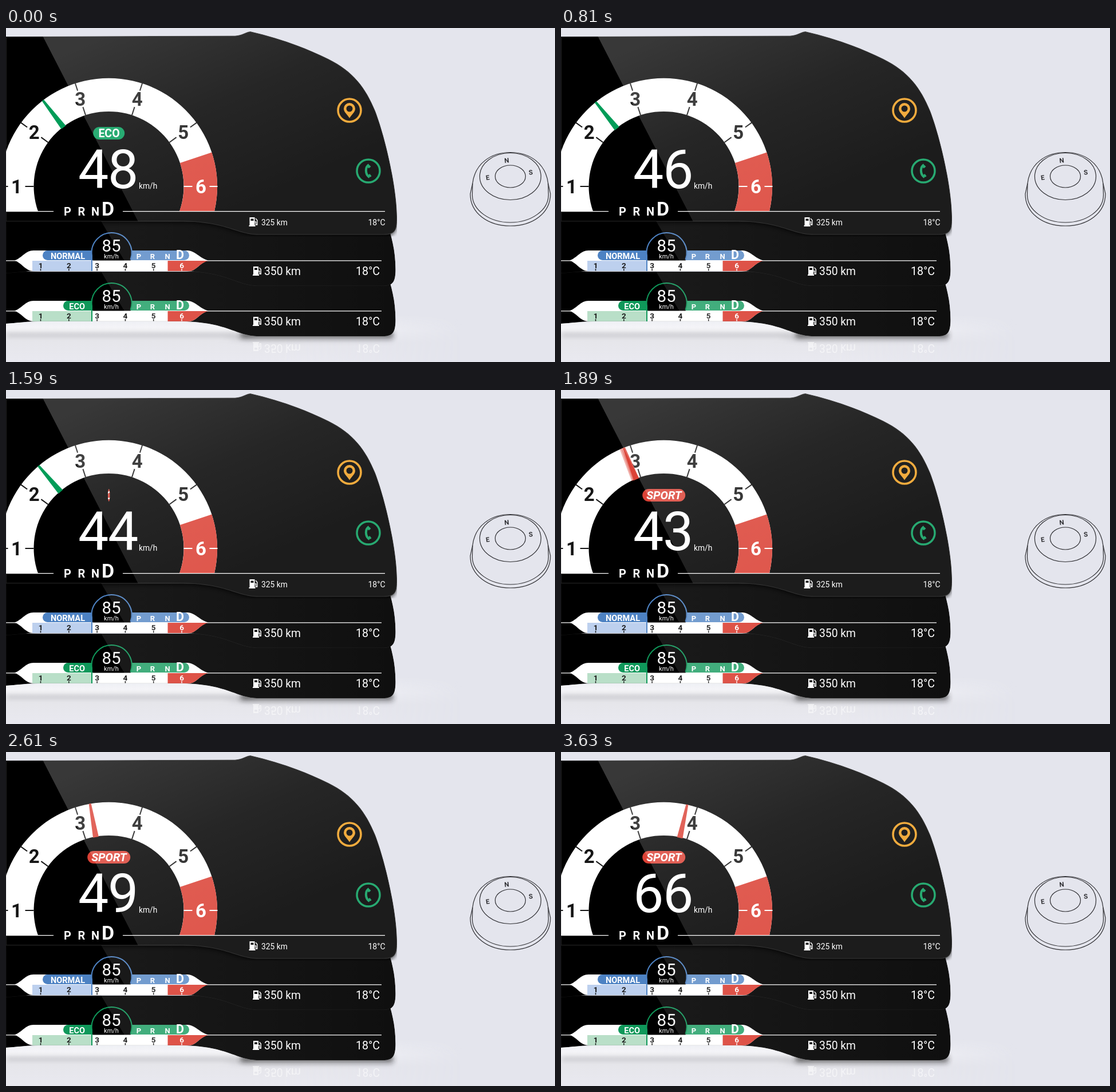
Recreate the animation shown at these times as an HTML page. Size 959 by 584 pixels, loop 3.66 s.

```html
<!DOCTYPE html>
<html lang="en">
<head>
<meta charset="utf-8">
<title>Instrument cluster</title>
<style>
  html, body { margin: 0; width: 100%; height: 100%; overflow: hidden; background: #e4e5ed; }
  svg { display: block; width: 959px; height: 584px; font-family: Roboto, Arial, sans-serif; }
  text { fill: #fff; }
  .b { font-weight: 700; }
  .m { text-anchor: middle; }
  .e { text-anchor: end; }
  .ink { fill: none; stroke: #303034; stroke-width: 1.2; }
  .knob text { fill: #303034; }
</style>
</head>
<body>
<svg viewBox="0 0 959 584">
  <defs>
    <linearGradient id="floor" x2="0" y2="1">
      <stop offset="0" stop-color="#fff" stop-opacity="0"/>
      <stop offset=".35" stop-color="#f6f6f9"/>
      <stop offset=".6" stop-color="#e6e6eb"/>
      <stop offset="1" stop-color="#e9e9f0"/>
    </linearGradient>
    <linearGradient id="side">
      <stop offset=".6" stop-color="#fff"/>
      <stop offset="1" stop-color="#fff" stop-opacity="0"/>
    </linearGradient>
    <mask id="fadeRight"><rect y="490" width="800" height="94" fill="url(#side)"/></mask>
    <linearGradient id="glare" gradientUnits="userSpaceOnUse" x1="180" y1="10" x2="330" y2="350">
      <stop offset="0" stop-color="#fff" stop-opacity=".22"/>
      <stop offset=".5" stop-color="#fff" stop-opacity=".15"/>
      <stop offset="1" stop-color="#fff" stop-opacity=".11"/>
    </linearGradient>
    <linearGradient id="dim" gradientUnits="userSpaceOnUse" x1="200" y1="0" x2="670" y2="0">
      <stop offset="0" stop-color="#fff" stop-opacity=".1"/>
      <stop offset="1" stop-color="#fff" stop-opacity=".06"/>
    </linearGradient>
    <filter id="soft" x="-20%" y="-100%" width="140%" height="300%"><feGaussianBlur stdDeviation="5"/></filter>
    <filter id="lift" x="-5%" y="-5%" width="110%" height="115%"><feGaussianBlur stdDeviation="3"/></filter>
    <path id="shell" d="M0 15 L400 13.5 C412 13 418 7 427 6 C476 17 523 34 563 54 C607 76 628 104 645 145 C664 195 684 285 683 336 C683 354 679 361.5 660 361.5 H442 C400 361.5 388 338 300 338 H0Z"/>
    <path id="tray" d="M0 250 H665 C673 275 680.5 300 680.5 334 C680.5 356 676 363 658 363 H442 C400 363 388 337 300 337 H60 C35 337 18 340 0 341Z"/>
    <clipPath id="shellClip"><use href="#shell"/></clipPath>
    <clipPath id="trayClip"><use href="#tray"/></clipPath>
    <clipPath id="pillClip"><rect id="pillCut" y="173" height="22" rx="11"/></clipPath>
    <g id="pump">
      <path d="M1 0 H10 V14 H11 V16 H0 V14 H1Z M3 2.5 V6 H8 V2.5Z" fill="#fff" fill-rule="evenodd"/>
      <path d="M10 8 H12 V13 H14.3 V5 L11.5 2" fill="none" stroke="#fff" stroke-width="1.4"/>
    </g>
  </defs>

  <rect width="959" height="584" fill="#e4e5ed"/>
  <rect y="500" width="800" height="84" fill="url(#floor)" mask="url(#fadeRight)"/>
  <path d="M0 532 H400 L440 542 H680 L672 547 H420 L380 541 H0Z" fill="#55555c" opacity=".25" filter="url(#soft)"/>
  <rect x="410" y="532" width="266" height="9" fill="#222" opacity=".8" filter="url(#soft)"/>
  <g transform="matrix(1 0 0 -1 0 1070)" opacity=".55" font-size="19.3">
    <use href="#pump" x="431" y="505"/>
    <text x="451" y="517">350 km</text>
    <text class="e" x="653" y="517">18°C</text>
  </g>

  <g id="trays"></g>

  <use href="#shell" y="3" filter="url(#lift)" opacity=".6" clip-path="inset(330px 0 0 0)"/>
  <g clip-path="url(#shellClip)">
    <use href="#shell"/>
    <path d="M-5.1 320 A189.5 189.5 0 1 1 364.1 320 H303.2 A131 131 0 1 0 55.8 320Z" fill="#fff"/>
    <path d="M359.4 217.5 A189.5 189.5 0 0 1 364.1 320 H303.2 A131 131 0 0 0 303.9 235.9Z" fill="#db4236"/>
    <g id="dial"></g>
    <g id="needles"></g>
    <path d="M0 320.7 H83 M204 320.7 H662" stroke="#fff" stroke-width="1.2"/>
    <rect id="pill" y="173" height="22" rx="11"/>
    <g clip-path="url(#pillClip)"><text id="mode" class="m b" x="180" y="191"></text></g>
    <text id="speed" class="m" x="178" y="280" font-size="95" letter-spacing="-1.5"></text>
    <text x="232" y="281" font-size="13.8">km/h</text>
    <g class="b" font-size="20">
      <text x="101" y="328">P</text><text x="125.5" y="328">R</text><text x="149" y="328">N</text>
      <text x="167" y="328" font-size="34">D</text>
    </g>
    <use href="#pump" x="424.5" y="331"/>
    <text x="446" y="344.5" font-size="13.8">325 km</text>
    <text class="e" x="662.5" y="344.5" font-size="14">18°C</text>
    <circle cx="600" cy="144" r="20" fill="none" stroke="#ef9f22" stroke-width="3.6"/>
    <path d="M600 157.5 C596 151 590 147 590 141 A10 10 0 0 1 610 141 C610 147 604 151 600 157.5Z M600 135.5 A5.5 5.5 0 0 0 600 146.5 A5.5 5.5 0 0 0 600 135.5Z" fill="#ef9f22" fill-rule="evenodd"/>
    <g stroke="#0d9f60">
      <circle cx="633" cy="250" r="20" fill="none" stroke-width="3.5"/>
      <path d="M634 239 C627 243 627 256 635 261" fill="none" stroke-width="4"/>
      <path d="M633 241 L635.5 244 M634.5 259 L637 257" stroke-width="5"/>
    </g>
    <path d="M64 14 L244.5 365 H700 V0 H64Z" fill="url(#glare)"/>
    <use href="#shell" fill="none" stroke="#777" stroke-opacity=".25" stroke-width="2"/>
  </g>

  <g class="ink">
    <path d="M815 272 C819 237 847 217.5 881 217.5 S943 237 947 272 L951 290 C951 324 920 346 881 346 S811 324 811 290Z"/>
    <path d="M815 272 L814.5 292 C815 319 845 340 881 340 S947.5 319 947.5 292 L947 272"/>
    <ellipse cx="881" cy="259.5" rx="53.5" ry="41"/>
    <ellipse cx="881" cy="259.5" rx="26.5" ry="19.5"/>
  </g>
  <g class="knob b m" font-size="11.5">
    <text transform="translate(875 235.5) rotate(-6)">N</text>
    <text transform="translate(842 265.5) rotate(-8)">E</text>
    <text transform="translate(917 256.5) rotate(-6)">S</text>
  </g>
  <g id="turn" fill="#4488d6">
    <path d="M892 203.5 Q909 205 924.5 212.5 L919.5 223 Q906 216.5 890 214.5Z"/>
    <path d="M844.5 296 Q858 303 873.5 304.5 L870.5 315.5 Q853 314 839 306Z"/>
  </g>
</svg>
<script>
const $ = id => document.getElementById(id);
const GREEN = [0, 156, 88], RED = [219, 66, 54];
const LOOP = 3660, CX = 179.5, CY = 277;
const clamp = x => Math.max(0, Math.min(1, x));
const span = (t, a, b) => clamp((t - a) / (b - a));
const smooth = p => p * p * (3 - 2 * p);
const mix = (a, b, p) => a + (b - a) * p;
const rgb = p => `rgb(${GREEN.map((c, i) => Math.round(mix(c, RED[i], p)))})`;

function tray(dy, label, pillX, color, tint) {
  const marks = [1, 2, 3, 4, 5, 6].map(n => {
    const x = 60.5 + (n - 1) * 49.3, ink = n > 5 ? '#fff' : '#1c1c1c';
    return `<text class="m b" x="${x}" y="331.5" font-size="13.5" style="fill:${ink}">${n}</text>
      <path d="M${x} 333 V336.5" stroke="${ink}" stroke-width="1.5"/>`;
  }).join('');
  const gears = ['P', 'R', 'N'].map((g, i) =>
    `<text class="m b" x="${[232, 256, 282][i]}" y="315.5" font-size="13">${g}</text>`).join('');
  return `<g transform="translate(0 ${dy})"><g clip-path="url(#trayClip)">
    <use href="#tray"/>
    <path d="M0 318.8 H656" stroke="#fff" stroke-width="1.3"/>
    <path d="M15 318.5 C28 314 34 301 48 301 H317 C331 302 338 314 353 318.5 C338 323 332 337 320 337 H48 C34 337 28 323 15 318.5Z" fill="#fff"/>
    <rect x="46" y="319" width="104" height="18" fill="${tint}"/>
    <path d="M282.5 319 H353 C338 323 332 337 320 337 H282.5Z" fill="#db4236"/>
    <rect x="${pillX}" y="301" width="${190 - pillX}" height="17" rx="8.5" fill="${color}"/>
    <rect x="180" y="301" width="140" height="17" rx="8.5" fill="${color}" opacity=".87"/>
    <path d="M151.5 318.5 A35 35 0 1 1 217.5 318.5Z" fill="#000"/>
    <path d="M150 337 V310 A35 35 0 1 1 217.5 317" fill="none" stroke="${color}" stroke-width="2"/>
    <text class="m" x="184" y="303" font-size="29.5">85</text>
    <text class="m" x="184" y="314.5" font-size="11">km/h</text>
    <text class="e b" x="138" y="315.5" font-size="14.5">${label}</text>
    ${gears}<text class="m b" x="304" y="315.5" font-size="21.5">D</text>${marks}
    <use href="#pump" x="431" y="329"/>
    <text x="451" y="344" font-size="19.3">350 km</text>
    <text class="e" x="653" y="344" font-size="19.6">18°C</text>
    <path d="M165 248 L234 365 H700 V248Z" fill="url(#dim)"/>
    <use href="#tray" fill="none" stroke="#555" stroke-opacity=".25"/>
  </g></g>`;
}
$('trays').innerHTML = tray(176, 'ECO', 100, '#0f985a', '#b9dfc8') + tray(88, 'NORMAL', 64, '#4d82c3', '#bdd0ee');

$('dial').innerHTML = [1, 2, 3, 4, 5, 6].map(n => {
  const a = (n - 1) * Math.PI / 5, c = -Math.cos(a), s = -Math.sin(a);
  const ink = n > 5 ? '#fff' : '#161616';
  const at = r => `${CX + c * r} ${CY + s * r}`;
  return `<path d="M${at(131)} L${at(146)} M${at(176)} L${at(190)}" stroke="${ink}" stroke-width="2"/>
    <text class="m" x="${CX + c * 161}" y="${CY + s * 161 + 12}" font-size="33" font-weight="600" style="fill:${ink}">${n}</text>`;
}).join('');

// Two faint copies trail the needle while it sweeps.
$('needles').innerHTML = '<path d="M-2 -189.5 H2 L5 -130 H-5Z"/>'.repeat(3);
const needles = [...$('needles').children];

function speedAt(t) {
  if (t < 2100) return 48.3 - t / 410;
  const u = t - 2100, ramp = 288;
  return 43.2 + (u < ramp ? u * u / (120 * ramp) : (u - ramp / 2) / 60);
}

function angleAt(t) {
  const v = speedAt(t);
  return mix(52.6 + (v - 48.3) * .76, 80 + (v - 49.3) * 1.32, smooth(span(t, 1675, 1970)));
}

function draw(t) {
  const sport = t > 1400;
  $('speed').textContent = Math.floor(speedAt(t));

  const sweep = t > 1675 && t < 1970, color = rgb(span(t, 1700, 1800));
  needles.forEach((el, i) => {
    const lag = 2 - i;
    el.setAttribute('transform', `translate(${CX} ${CY}) rotate(${angleAt(sweep ? t - lag * 9 : t) - 90})`);
    el.setAttribute('fill', color);
    el.setAttribute('opacity', lag ? (sweep ? .4 : 0) : 1);
  });

  const shrink = span(t, 300, 640);
  const w = sport ? 75 * smooth(span(t, 1560, 1800)) : 55 * (1 - shrink * shrink);
  for (const el of [$('pill'), $('pillCut')]) {
    el.setAttribute('x', 179.7 - w / 2);
    el.setAttribute('width', w);
  }
  $('pill').setAttribute('fill', rgb(sport ? 1 : 0));
  const mode = $('mode');
  mode.textContent = sport ? 'SPORT' : 'ECO';
  mode.setAttribute('font-size', sport ? 20 : 19.5);
  mode.setAttribute('font-style', sport ? 'italic' : 'normal');

  $('turn').setAttribute('opacity', span(t, 240, 360) * (1 - span(t, 640, 760)));
}

function tick(now) {
  draw(now % LOOP);
  requestAnimationFrame(tick);
}
draw(0);
requestAnimationFrame(tick);
</script>
</body>
</html>
```
